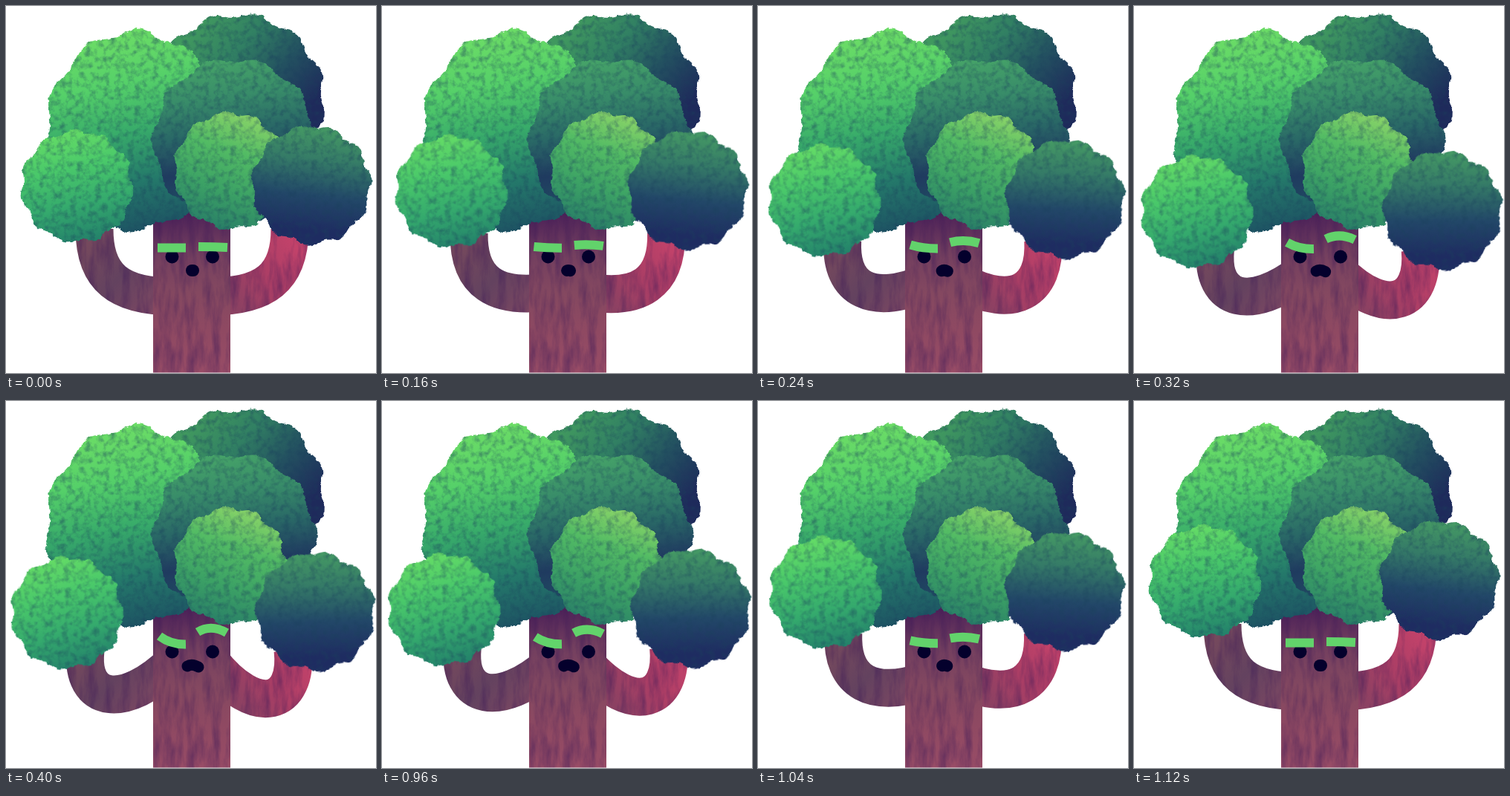
Write an HTML page that moves like this. It is 498 px wide and 494 px high and loops after 1360 ms.

```html
<!DOCTYPE html>
<html>
<head>
<meta charset="utf-8">
<style>
  html, body { margin: 0; width: 100%; height: 100%; overflow: hidden; background: #fff; }
  svg { display: block; width: 498px; height: 494px; }
</style>
</head>
<body>
<svg viewBox="0 0 498 494">
  <defs id="defs">
    <filter id="leaf" filterUnits="userSpaceOnUse" x="-150" y="-150" width="300" height="300" color-interpolation-filters="sRGB">
      <feTurbulence type="fractalNoise" baseFrequency=".12" numOctaves="4" seed="4" result="noise"/>
      <feDisplacementMap in="SourceGraphic" in2="noise" scale="6" xChannelSelector="R" yChannelSelector="G" result="rough"/>
      <feColorMatrix in="noise" values="0 0 0 0 .1  0 0 0 0 .25  0 0 0 0 .36  1 0 0 0 -.42"/>
      <feComposite in2="rough" operator="atop"/>
    </filter>
    <filter id="wood" filterUnits="userSpaceOnUse" x="0" y="250" width="498" height="250" color-interpolation-filters="sRGB">
      <feTurbulence type="fractalNoise" baseFrequency=".09 .02" numOctaves="5" seed="9"/>
      <feColorMatrix values="0 0 0 0 .24  0 0 0 0 .1  0 0 0 0 .34  1 0 0 0 -.38"/>
      <feComposite in2="SourceGraphic" operator="atop"/>
    </filter>
  </defs>
  <g id="body" filter="url(#wood)" fill="none" stroke-width="51"></g>
  <g id="crown"></g>
  <g id="face" fill="#04002c" stroke-width="12"></g>
</svg>
<script>
const $ = id => document.getElementById(id);

function add(parent, tag, attrs) {
  const el = document.createElementNS('http://www.w3.org/2000/svg', tag);
  for (const k in attrs) el.setAttribute(k, attrs[k]);
  return $(parent).appendChild(el);
}

// Linear gradient along a line, colours evenly spaced
let paints = 0;
function paint([x1, y1, x2, y2], ...colors) {
  const id = 'paint' + paints++;
  add('defs', 'linearGradient', { id, x1, y1, x2, y2, gradientUnits: 'userSpaceOnUse' });
  colors.forEach((c, i) => add(id, 'stop', { offset: i / (colors.length - 1), 'stop-color': c }));
  return `url(#${id})`;
}

const place = (el, x, y, turn = 0) => el.setAttribute('transform', `translate(${x} ${y}) rotate(${turn})`);

// Scalloped ellipse around (x, y); one bump points towards phase (degrees)
function foliage(x, y, rx, ry, bumps, phase, fill) {
  const points = [];
  for (let deg = 0; deg < 360; deg += 3) {
    const a = deg * Math.PI / 180;
    const k = 1 + 0.035 * Math.cos(bumps * (a - phase * Math.PI / 180));
    points.push(rx * k * Math.cos(a), ry * k * Math.sin(a));
  }
  const el = add('crown', 'polygon', { points: points.join(' '), fill, filter: 'url(#leaf)' });
  place(el, x, y);
  return el;
}

const armL = add('body', 'path', { stroke: paint([110, 320, 205, 400], '#75495d', '#63425f', '#7b4762') });
const armR = add('body', 'path', { stroke: paint([395, 330, 300, 390], '#c2426a', '#ab3e65', '#8b4162') });
add('body', 'rect', { x: 198, y: 262, width: 104, height: 231.5,
  fill: paint([240, 278, 260, 494], '#4c2158', '#733f5f', '#844860', '#8f4962', '#984c66') });

foliage(312, 125, 115, 113, 12, 12, paint([-45, -110, 92, 15], '#40985f', '#318063', '#235060', '#1e2a5b'));
foliage(173, 168, 118, 133, 10, -15, paint([-20, -130, 30, 130], '#6bdc66', '#55d069', '#37aa6a', '#24796a', '#1d5363'));
foliage(307, 181, 108, 109, 10, 0, paint([-15, -107, 10, 85], '#45a268', '#388c69', '#296766', '#203a60', '#205062'));
foliage(302, 222, 75, 78, 11, 0, paint([25, -76, -25, 76], '#8ad468', '#52bb64', '#3ca265', '#297f67'));
const handL = foliage(0, 0, 74.5, 74.5, 11, 5, paint([-15, -75, 15, 75], '#65dc66', '#49c86a', '#34a96d', '#23806a'));
const handR = foliage(0, 0, 79, 79, 11, -5, paint([8, -78, -8, 60], '#459a64', '#347967', '#224768', '#1e2c61'));

for (const cx of [223.5, 278]) add('face', 'circle', { cx, cy: 337.5, r: 9 });
const line = attrs => add('face', 'path', { fill: 'none', ...attrs });
const browL = line({ stroke: '#62d36b' });
const browR = line({ stroke: '#62d36b' });
const mouth = line({ stroke: '#04002c', 'stroke-linecap': 'round' });

// Curve between its raised (p = 0) and lowered (p = 1) form
function bend(el, p, up, down) {
  const v = up.map((a, i) => a + (down[i] - a) * p);
  el.setAttribute('d', `M${v.slice(0, 2)} ${v.length > 6 ? 'C' : 'Q'}${v.slice(2)}`);
}

function pose(p) {
  bend(armL, p, [119,300, 119,366, 152,391, 225,391], [107,335, 100,408, 160,415, 225,352]);
  bend(armR, p, [382,300, 382,366, 348,391, 275,391], [386,335, 394,408, 338,430, 275,350]);
  bend(browL, p, [204,325.5, 223,325.5, 242,325.5], [206.5,316.5, 222,328, 242,327.5]);
  bend(browR, p, [259,324, 279,324, 298,325], [258,311, 276,300, 297,312]);
  bend(mouth, p, [250,356, 251,356, 252,356], [244,357, 250,353, 259,358]);
  mouth.setAttribute('stroke-width', 16 - p);
  place(handL, 95.5 - 13.5 * p, 243 + 42.5 * p, -5 * p);
  place(handR, 411 + 5.5 * p, 241 + 42.5 * p, -8 * p);
}

function ease(u) {
  u = Math.min(1, Math.max(0, u));
  return u * u * (3 - 2 * u);
}

// The motion advances in steps of 80 ms
const STEP = 80, LOOP = 1360;
let shown = -1;
function tick() {
  const t = Math.floor(performance.now() % LOOP / STEP) * STEP;
  if (t !== shown) {
    shown = t;
    pose(ease((t / 400) ** 1.5) - ease((t - 920) / 200));
  }
  requestAnimationFrame(tick);
}
tick();
</script>
</body>
</html>
```
